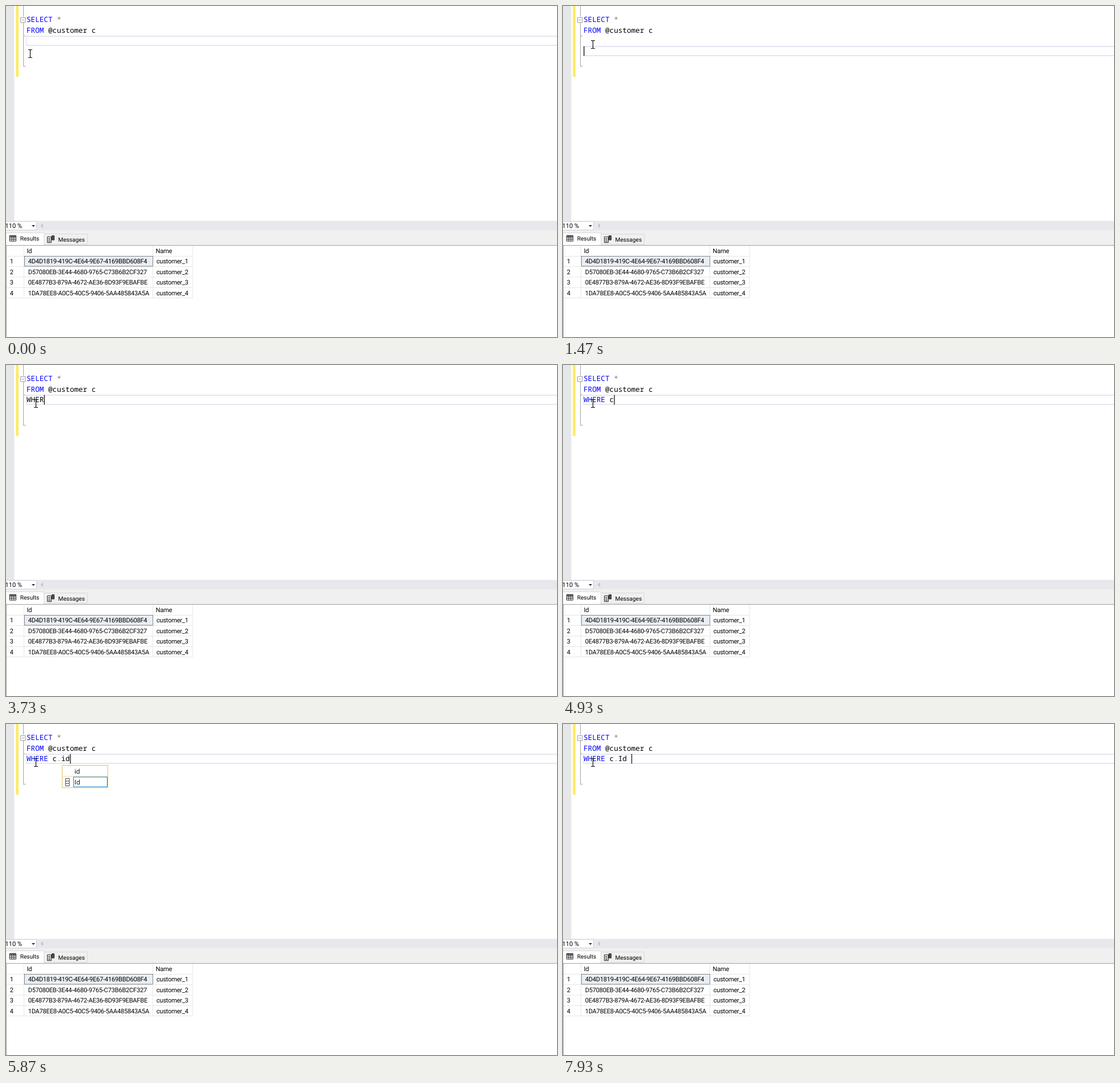
An HTML page that plays this animation: 966x580 px, repeating every 8 s.

```html
<!DOCTYPE html>
<html lang="en">
<head>
<meta charset="utf-8">
<title>Query editor</title>
<style>
html, body { margin: 0; width: 100%; height: 100%; overflow: hidden; background: #fff; }
svg { display: block; width: 966px; height: 580px; }
text { white-space: pre; text-rendering: geometricPrecision; }
.code { font: 12.667px "Noto Sans Mono", monospace; }
.ui { font: 10.2px Roboto, sans-serif; }
#grid { font-size: 11.1px; letter-spacing: -.24px; }
.list { font: 11.3px "Open Sans", sans-serif; }
.kw { fill: #00f; }
.op { fill: #777; }
</style>
</head>
<body>
<svg viewBox="0 0 966 580">
  <!-- editor -->
  <rect width="14.5" height="377" fill="#e6e7e8"/>
  <rect x="17.3" width="4.7" height="124" fill="#fbec69"/>
  <path d="M30.5 0V19M30.5 29V106M30 52.5h4.5M30 105.5h4.5" stroke="#a5a5a5" fill="none"/>
  <path d="M25.5 20.5h8.5v8.5h-8.5zM27.5 24.7h4.5" stroke="#999" fill="#fff"/>
  <g id="line" fill="#e6e6f0">
    <rect x="35" y="52" width="931" height="2"/>
    <rect x="35" y="68" width="931" height="2"/>
    <rect x="35" y="52" width="1.5" height="18"/>
  </g>
  <g class="code">
    <text x="36" y="28"><tspan class="kw">SELECT</tspan> <tspan class="op">*</tspan></text>
    <text x="36" y="47"><tspan class="kw">FROM</tspan> @customer c</text>
    <text id="typed" x="36" y="65"></text>
  </g>
  <rect id="caret" width="1.4" height="17" fill="#222"/>
  <g id="popup" class="list"></g>
  <g id="mouse" fill="none" stroke="#111" stroke-width="1.2">
    <path d="M-3.5 -7h2.5l1 1l1 -1h2.5M-3.5 7h2.5l1 -1l1 1h2.5M0 -6V6"/>
  </g>

  <!-- zoom box, scrollbar and tabs -->
  <rect y="376.5" width="966" height="17" fill="#e8e8ec"/>
  <path d="M-1 377.5H53.5V392.5H-1z" fill="#fff" stroke="#cccedb"/>
  <text class="ui" x="-1.5" y="389" style="font-size:11.1px">110 %</text>
  <path d="M45 384h6l-3 3z" fill="#222"/>
  <path d="M65 380.5v9l-4.5 -4.5z" fill="#c6c7ce"/>
  <rect y="393" width="966" height="26" fill="#f0f0f0"/>
  <path d="M0 419V397.5H66.5V419" fill="#fff" stroke="#dcdcdc"/>
  <path d="M66.5 399.5H142.5V417.5H66.5" fill="none" stroke="#d9d9d9"/>
  <g fill="none" stroke="#222">
    <path d="M6.5 402.5h11v9.5h-11zM6.5 405.5h11M6.5 408.7h11M10.2 402v10M13.8 402v10"/>
    <path d="M6 403h12" stroke-width="2"/>
    <path d="M72.5 404.5h7v10h-7zM74 407.5h4M74 410h4M74 412.5h4"/>
    <path d="M80.5 402.5h4v7.5h-4z" fill="#555"/>
  </g>
  <text class="ui" x="24.7" y="411">Results</text>
  <text class="ui" x="91.5" y="412.7">Messages</text>

  <!-- result grid -->
  <path d="M0 419.5H966" stroke="#a0a0a0"/>
  <path d="M.5 419V580" stroke="#a0a0a0"/>
  <g id="grid" class="ui"></g>
</svg>
<script>
const $ = id => document.getElementById(id);
const CHAR = 7.6, ROW = 18.6, LOOP = 8000;
const text = (x, y, s, extra = '') => `<text x="${x}" y="${y}" ${extra}>${s}</text>`;

const ids = [
  '4D4D1819-419C-4E64-9E67-4169BBD608F4',
  'D57080EB-3E44-4680-9765-C73B6B2CF327',
  '0E4877B3-879A-4672-AE36-8D93F9EBAFBE',
  '1DA78EE8-A0C5-40C5-9406-5AA485843A5A'
];
$('grid').innerHTML =
  '<path d="M1 438.5H327M1 456.5H327M1 475H327M1 493.5H327M1 511.5H327M31.5 420V512M257.5 420V512M327 420V512" stroke="#e6e6e6"/>' +
  '<rect x="32.5" y="438.5" width="225" height="17.5" fill="#e9eef4" stroke="#222" stroke-dasharray="1 1"/>' +
  text(36.5, 432.5, 'Id') + text(262.5, 432.5, 'Name') +
  ids.map((id, i) => {
    const y = 451.2 + 18.5 * i;
    return text(6.8, y, i + 1) + text(38.7, y, id) + text(263.7, y, 'customer_' + (i + 1));
  }).join('');

const functions = ['c', 'CASE', 'CAST', 'CEILING', 'CERTENCODED', 'CERTPRIVATEKEY', 'CERTPROPERTY',
  'CHANGE_TRACKING_CURRENT_VERSION', 'CHANGE_TRACKING_IS_COLUMN_IN_MASK'];
const columns = (head, items, picked) => ({ x: 98.5, w: 80, head, items, picked });

// each step changes only the listed properties from its time on
const steps = [
  [0, { s: '', row: 0, caret: 0, mouse: [42.5, 83.5], pop: null }],
  [70, { mouse: [45, 80] }],
  [130, { mouse: [48, 77] }],
  [270, { row: 1, caret: 1 }],
  [470, { mouse: [48.5, 78] }],
  [800, { caret: 0, mouse: [49, 77] }],
  [1130, { mouse: [52.5, 74] }],
  [1330, { caret: 1 }],
  [1400, { mouse: [52.5, 67.5] }],
  [1530, { row: 0 }],
  [2070, { caret: 0 }],
  [2400, { s: 'W' }],
  [2600, { s: 'WH', caret: 1 }],
  [3130, { caret: 0 }],
  [3200, { s: 'WHE' }],
  [3670, { caret: 1 }],
  [3730, { s: 'WHER' }],
  [4070, { s: 'WHERE' }],
  [4200, { caret: 0 }],
  [4730, { s: 'WHERE ', caret: 1 }],
  [4930, { s: 'WHERE c' }],
  [5070, { pop: { x: 83, w: 359, head: 'c', items: functions } }],
  [5130, { s: 'WHERE c.', pop: null }],
  [5270, { caret: 0, pop: columns('', ['Id', 'Name']) }],
  [5530, { s: 'WHERE c.i' }],
  [5600, { pop: columns('i', ['Id']) }],
  [5800, { caret: 1 }],
  [5870, { s: 'WHERE c.id', pop: columns('id', ['Id']) }],
  [6270, { pop: columns('id', ['Id'], true) }],
  [6330, { caret: 0 }],
  [6600, { s: 'WHERE c.Id', pop: null }],
  [6870, { caret: 1 }],
  [7330, { caret: 0 }],
  [7930, { s: 'WHERE c.Id ', caret: 1 }]
];

function popup({ x, w, head, items, picked }) {
  const h = ROW * (items.length + 1) + 2;
  return `<rect x="${x}" y="72.5" width="${w}" height="${h}" fill="#fff" stroke="#dfc06c"/>` +
    `<path d="M${x} 91.5h${w}" stroke="#eadbae"/>` +
    `<rect x="${x + 20}" y="93" width="${w - 21}" height="17" fill="${picked ? '#007acc' : '#fff'}" stroke="#1f82c4"/>` +
    text(x + 21.5, 86.5, head) +
    items.map((name, i) => {
      const y = 106 + ROW * i;
      return `<path d="M${x + 6} ${y - 10.5}h6.5v13h-6.5zm0 4.5h6.5m-6.5 4.2h6.5" fill="none" stroke="#424242"/>` +
        text(x + 21.5, y, name, picked ? 'fill="#fff"' : '');
    }).join('');
}

function show({ s, row, caret, mouse, pop }) {
  $('typed').innerHTML = s
    .replace('WHERE', '<tspan class="kw">WHERE</tspan>')
    .replace('.', '<tspan class="op">.</tspan>');
  $('line').setAttribute('transform', `translate(0 ${row * 18})`);
  $('caret').setAttribute('transform', `translate(${36.2 + CHAR * s.length} ${52.5 + row * 18})`);
  $('caret').setAttribute('opacity', caret);
  $('mouse').setAttribute('transform', `translate(${mouse})`);
  $('popup').innerHTML = pop ? popup(pop) : '';
}

let shown = -1;
const start = performance.now();
function tick() {
  const t = (performance.now() - start) % LOOP;
  const count = steps.filter(([at]) => at <= t).length;
  if (count !== shown) {
    shown = count;
    show(Object.assign({}, ...steps.slice(0, count).map(([, change]) => change)));
  }
  requestAnimationFrame(tick);
}
tick();
</script>
</body>
</html>
```
